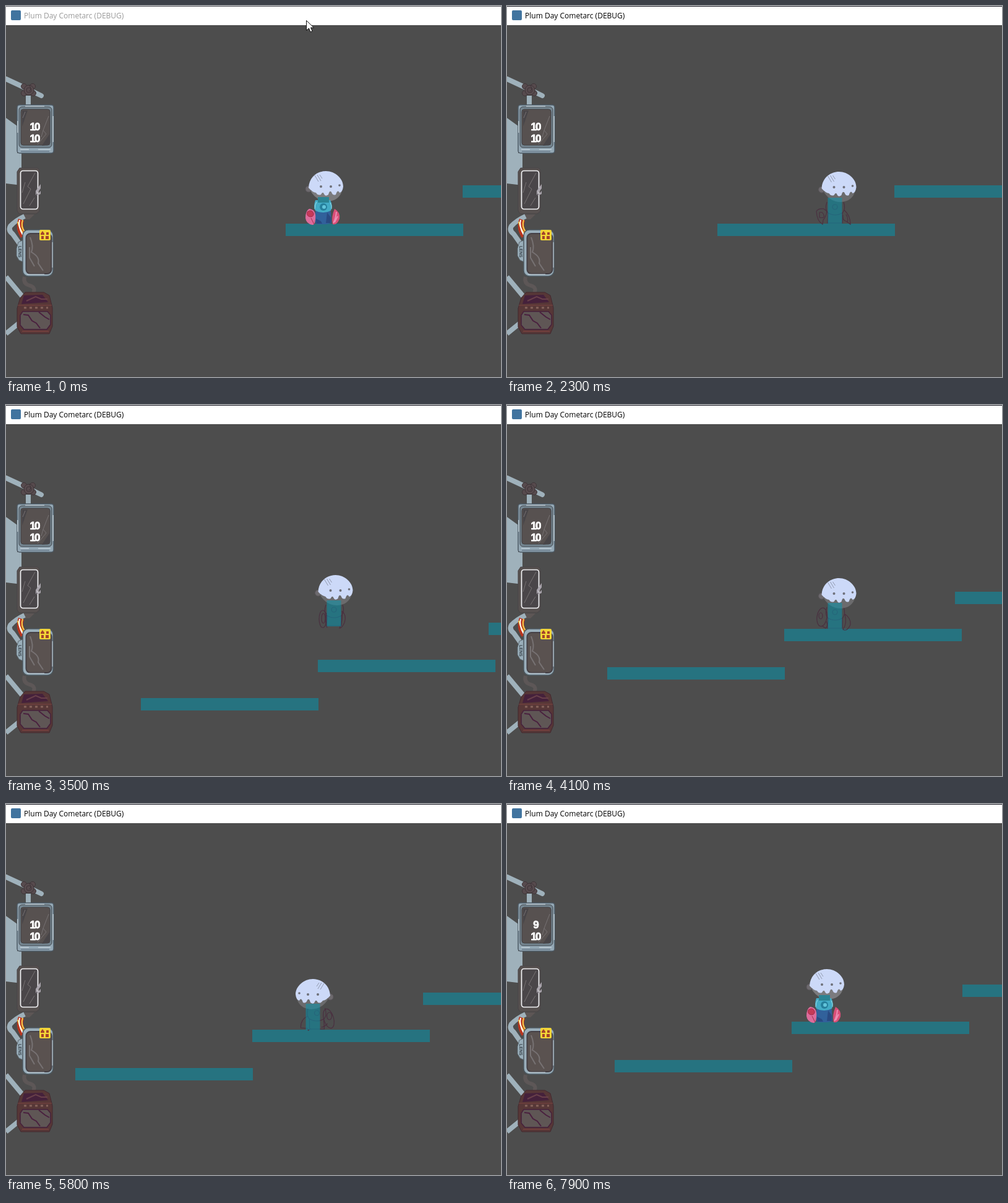
An HTML page for the animation above (8 s loop, 800 px wide and 600 px high).

```html
<!DOCTYPE html>
<html lang="en">
<head>
<meta charset="utf-8">
<title>Platform game</title>
<style>
html, body { margin: 0; width: 100%; height: 100%; overflow: hidden; background: #4d4d4d; }
svg { display: block; width: 800px; height: 600px; }
.line { fill: none; stroke: #4a3040; stroke-width: 1.2; }
.pipe { fill: none; stroke: #9fb1bb; stroke-width: 8; }
.teal { fill: #267380; }
.glass { fill: #5a5250; stroke: #454045; }
.crack { fill: none; stroke: #777273; }
.count { font: bold 17px "Liberation Sans", sans-serif; letter-spacing: -2px; fill: #fff; stroke: #fff; stroke-width: .8; }
</style>
</head>
<body>
<svg viewBox="0 0 800 600">
  <rect width="800" height="600" fill="#4d4d4d"/>

  <!-- level -->
  <g id="level" class="teal">
    <rect width="287" height="20"/>
    <rect x="286" y="-62" width="287" height="20"/>
    <rect x="562" y="-122" width="287" height="20"/>
  </g>

  <!-- player: origin at the middle of the feet -->
  <g id="player">
    <g id="sprite">
      <g id="walk0" class="line">
        <path d="M-30-20Q-29-4-20 1L-19-6Q-14-12-13-20L-18-24Q-27-25-30-20M-25-18Q-20-20-18-14T-25-10ZM15-22Q25-13 25 1L18-4Q12-5 13-14M18-15Q22-8 20-3"/>
      </g>
      <g id="walk1" class="line">
        <ellipse cx="-21" cy="-19" rx="8" ry="15" transform="rotate(8 -21 -19)"/>
        <ellipse cx="-23" cy="-21" rx="3" ry="5"/>
        <path d="M-14-12Q-10-5-15-1L-20-4M16-24Q26-17 25-7Q20 5 13 1Q20-8 16-24"/>
      </g>
      <g id="walk2" class="line">
        <ellipse cx="-19" cy="-18" rx="8" ry="16" transform="rotate(16 -19 -18)"/>
        <ellipse cx="-20" cy="-22" rx="4" ry="6"/>
        <path d="M-17-10Q-12-4-7-4M15-22Q27-16 26-3L15-2L14 1L10-2"/>
      </g>
      <g id="jump" class="line">
        <ellipse cx="-18" cy="-12" rx="6" ry="14"/>
        <ellipse cx="-17" cy="-13" rx="3" ry="8"/>
        <path d="M13-25Q21-18 17-6Q13 3 9 3Q15-10 13-25M-12-22Q-16-8-11 2"/>
      </g>
      <path id="jar" class="line" d="M-13-35Q-17-23-11-17L-12-1H12L12-17Q18-24 14-35M-12-18Q0-10 13-18M-4-27a4 4 0 1 0 8 0a4 4 0 1 0-8 0"/>
      <g id="head">
        <path id="chin" d="M-26-54Q-16-35 3-35Q21-36 26-52Z" fill="#7b7b7e"/>
        <circle cx="-28" cy="-55" r="5" fill="#6d6a6e" stroke="#5b565b"/>
        <path d="M-28-57C-27-75-13-84 0-84C15-84 28-72 28-59Q27-50 22-49Q19-55 16-46Q11-44 9-50Q6-54 4-46Q-1-42-3-47Q-5-52-8-46Q-13-44-16-49Q-22-50-28-57Z" fill="#ccd9f8"/>
        <path d="M-18-77L-12-67M-14-78L-8-68M-10-78L-6-72" stroke="#9199ae" fill="none"/>
        <g fill="#6e7079"><circle cx="-8" cy="-59" r="2"/><circle cx="8" cy="-59" r="2"/><circle cx="22" cy="-61" r="1.8"/></g>
      </g>
    </g>
    <rect id="hitbox" x="-11.5" y="-42" width="23" height="42" fill="#0099b3" opacity=".5"/>
    <g id="idle">
      <path d="M-13-20H12L13-1L5 1H-9L-13-1Z" fill="#31619b"/>
      <path d="M-12-8L-4-4L-2 0H-12M6-18L12-10V-1H4Z" fill="#294a82"/>
      <path d="M-13-38Q-17-27-13-21Q0-15 12-21Q16-29 11-38Z" fill="#43abc6"/>
      <path d="M-9-43H9V-34H-9Z" fill="#2b8393"/>
      <circle cy="-27" r="6" fill="#257f9c"/><circle cx="1" cy="-27" r="3" fill="#62c4da"/>
      <path d="M-14-24Q-14-31-11-35M13-24Q14-29 11-34" stroke="#9cdbe5" fill="none"/>
      <path d="M-23-24Q-11-23-13-7Q-14 3-18 2Q-28 0-29-9Q-29-21-23-24Z" fill="#dd6c9c"/>
      <path d="M-26-19q7-5 10 2q1 5-4 6q-8 0-6-8M-20-9L-15 1" stroke="#a52a4c" fill="#c63a58"/>
      <path d="M18-24Q28-18 26-8Q22 3 15 1Q12-10 18-24Z" fill="#d94f78"/>
      <path d="M21-19Q20-8 16-1M23-12L18-2" stroke="#ec8db4" stroke-width="2" fill="none"/>
    </g>
  </g>

  <!-- instruments -->
  <path class="pipe" d="M0 118L28 131L57 145" stroke-linecap="round"/>
  <path class="pipe" d="M36 145V161M0 438L30 474M0 530L22 512"/>
  <path d="M0 181L18 194V238H25V290L0 287Z" fill="#9fb1bb"/>
  <g fill="#574b4e" stroke="#3f3539">
    <circle cx="29" cy="130" r="4.5"/><circle cx="43" cy="130" r="4.5"/>
    <circle cx="29" cy="141" r="4.5"/><circle cx="44" cy="141" r="4.5"/>
    <circle cx="37" cy="136" r="8"/><circle cx="37" cy="136" r="4"/>
    <path d="M37 128Q43 134 37 138" fill="none"/>
  </g>

  <rect x="18" y="160" width="59" height="78" rx="4" fill="#94a8b5" stroke="#4c5964" stroke-width="1.5"/>
  <rect x="21" y="163" width="53" height="66" rx="5" fill="#748590" stroke="#43484e"/>
  <rect x="24" y="167" width="47" height="58" rx="4" fill="#575150" stroke="#403e40"/>
  <path d="M26 169H35L26 195ZM58 226L71 206V224Z" fill="#484548"/>
  <path class="crack" d="M69 178L60 201L65 207L51 224M60 201L57 212M31 171L27 181"/>
  <path d="M31 162H62M23 232H37M52 232H72M19 186V205M76 178V220" stroke="#c0cdd5" stroke-width="1.5"/>
  <path d="M24 235H70" stroke="#566777"/>
  <text class="count" id="ammo" x="46" y="201" text-anchor="middle">10</text>
  <text class="count" x="46" y="220" text-anchor="middle">10</text>

  <path d="M22 262H51L54 265V332L49 336H21L18 331V268Z" fill="#575150" stroke="#494447"/>
  <rect x="23.5" y="266.5" width="28" height="62" rx="4" fill="#4a4649" stroke="#f2f2f5" stroke-width="1.7"/>
  <path class="crack" d="M47 270L35 292L40 296L28 320M31 285L26 302M46 310L38 323"/>
  <path d="M48 299L56 288V295L48 306M49 307L56 299V304Z" fill="#aaa5ad"/>
  <path d="M27 337H46L38 345H28Z" fill="#5d5655"/>

  <path d="M30 340Q15 347 7 356Q3 363 11 369L23 386" class="pipe" stroke-width="6"/>
  <path d="M20 344L29 347Q25 359 33 368L24 375Q14 360 20 344Z" fill="#b83620"/>
  <path d="M19 349Q22 361 30 370M27 346Q23 357 31 366" fill="none" stroke="#f5d14c" stroke-width="2"/>
  <path d="M22 346Q19 356 27 370" fill="none" stroke="#fff" stroke-width="2"/>

  <path d="M29 378L20 382L17 392V404L21 411L30 415Z" fill="#9aafbb" stroke="#5c6870"/>
  <rect x="27" y="362" width="49" height="75" rx="9" fill="#9aafbb" stroke="#4d5961" stroke-width="1.5"/>
  <rect x="32.5" y="368" width="41" height="65" rx="7" class="glass" stroke-width="2"/>
  <path class="crack" d="M39 374Q45 389 41 398Q55 406 52 416L60 428M38 390V407L46 421" stroke-width="2"/>
  <path d="M75 382V423M34 434H62" stroke="#c7d4dc"/>
  <text transform="translate(20 388) rotate(90)" fill="#38424a" style="font:bold 7px 'Liberation Sans',sans-serif">LENS</text>
  <rect x="54" y="362" width="18" height="17" rx="2" fill="#f2d437"/>
  <path d="M56 368L59 364L62 368V370H56ZM65 366H69V370H65ZM57 372H61V377H57ZM64 372H69V377H64Z" fill="#a4432b"/>

  <path d="M30 438Q27 449 38 452T44 464" fill="none" stroke="#5d5757" stroke-width="6"/>
  <path d="M31 463H61L70 468L75 488V518L70 530H24L18 519V489L23 472Z" fill="#573737" stroke="#43282f"/>
  <path d="M29 468L59 467L68 479L25 482Z" fill="#45213b"/>
  <path d="M33 477L48 470L57 474L67 474" fill="none" stroke="#69404a" stroke-width="2"/>
  <path d="M19 484H74" stroke="#7a4540"/>
  <path d="M29 488H68" stroke="#85625a" stroke-width="3" stroke-dasharray="4 5"/>
  <path d="M27 494H67L72 500V515L66 523H29L23 516V500Z" fill="#5f5655" stroke="#46203b" stroke-width="1.5"/>
  <path d="M28 499L36 500L42 509L49 513L55 521M53 495L63 503L70 507" fill="none" stroke="#4a203f" stroke-width="2"/>
  <path d="M26 526H69" stroke="#713f3d" stroke-width="2"/>

  <!-- window bar -->
  <rect width="800" height="31" fill="#fff"/>
  <rect id="edge" width="800" height="1"/>
  <rect x="8" y="7" width="16" height="16" rx="2" fill="#41749f"/>
  <text id="caption" x="29" y="20" style="font:12px 'Open Sans','Noto Sans',sans-serif">Plum Day Cometarc (DEBUG)</text>
  <path id="cursor" d="M.5.5V16.5L4.5 13L7 19L10 17.5L7.5 12H12.5Z" fill="#fff" stroke="#111"/>
</svg>
<script>
const $ = id => document.getElementById(id);
const move = (id, x, y) => $(id).setAttribute("transform", `translate(${x} ${y})`);
const show = (id, on) => $(id).style.display = on ? "" : "none";

const LOOP = 8000, SUB = 20, DT = 1 / SUB;
const RUN = 11.15, JUMP = 48.4, GRAVITY = 8.4;
const LAG_X = .63, LAG_Y = .45;
const HOLDS = [16, 26, 37, 48, 59, 70];       // ticks without a new game step
const JUMPS = [299, 580];                     // in substeps
const POSES = ["walk0", "walk1", "walk2", "jump"];
const HEAD = { walk0: [6.5, 0], walk1: [6.5, 2], walk2: [6.5, 2], jump: [2.5, 1], idle: [4, -1] };
const CURSOR = [[485, 23], [612, 18], [743, 13]];

function heading(s) {
  if (s > .4 && s < 36.4) return 1;
  if (s > 37.04 && s < 50.27) return -1;
  return s >= 50.27 && s < 52.5 ? 1 : 0;
}

// Runs the player and the trailing camera up to a game step.
function simulate(step) {
  let x = 0, h = 0, vy = 0, camX = 0, camY = 0, air = false;
  for (let i = 0; i < step * SUB; i++) {
    x += heading(i * DT) * RUN * DT;
    if (JUMPS.includes(i)) { vy = JUMP; air = true; }
    if (air) {
      vy -= GRAVITY * DT;
      h += vy * DT;
      const ground = x > 225 ? 62 : 0;
      if (vy < 0 && h <= ground) { h = ground; air = false; }
    }
    camX += (x - camX) * LAG_X * DT;
    camY += (h - camY) * LAG_Y * DT;
  }
  return { x, h, camX, camY, air };
}

function draw(time) {
  const tick = Math.floor(time / 100);
  const step = Math.max(0, tick - 10 - HOLDS.filter(t => t <= tick).length);
  const { x, h, camX, camY, air } = simulate(step);
  const dir = heading(step);
  const pose = air ? "jump" : dir ? "walk" + step % 3 : "idle";
  const idle = pose === "idle";

  move("level", Math.round(452 - camX), Math.round(352 + camY));
  move("player", Math.round(513 + x - camX), Math.round(352 - h + camY));
  $("sprite").setAttribute("transform", step > 37 && step < 51 ? "translate(6.5) scale(-1 1)" : "");
  move("head", ...HEAD[pose]);
  for (const p of POSES) show(p, p === pose);
  show("idle", idle);
  show("jar", !idle);
  show("hitbox", !idle);
  $("chin").setAttribute("opacity", idle ? 1 : .65);

  const active = tick >= 6;
  $("caption").setAttribute("fill", active ? "#000" : "#999");
  $("edge").setAttribute("fill", active ? "#1a1a24" : "#55555c");
  $("ammo").textContent = tick < 75 ? "10" : "9";
  show("cursor", tick < 3);
  if (tick < 3) move("cursor", ...CURSOR[tick]);
}

const start = performance.now();
function frame() {
  draw((performance.now() - start) % LOOP);
  requestAnimationFrame(frame);
}
frame();
</script>
</body>
</html>
```
